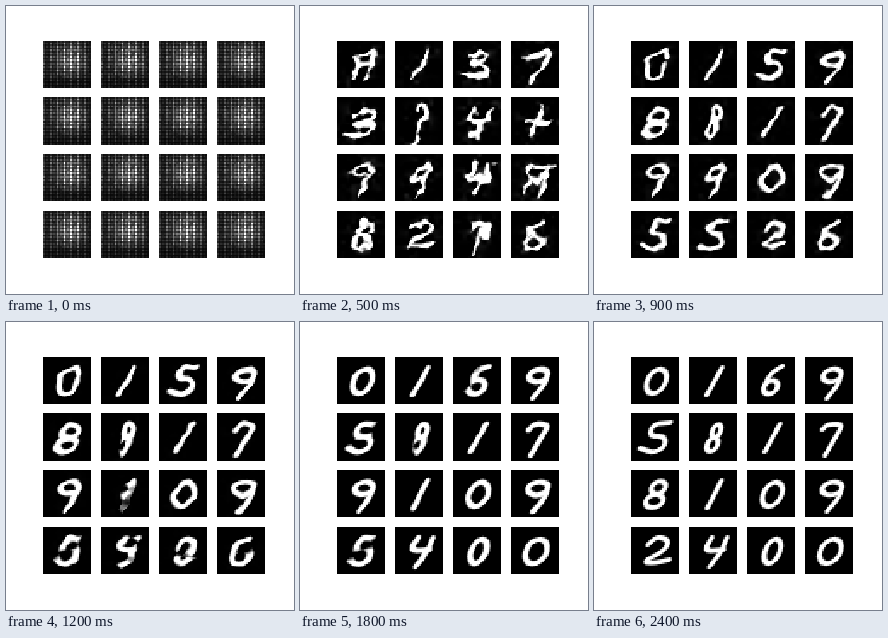
An HTML page with a canvas for the animation above (2.5 s loop, 288 by 288 pixels).

```html
<!DOCTYPE html>
<html lang="en">
<head>
<meta charset="utf-8">
<title>Digits emerging from noise</title>
<style>
html, body { margin: 0; width: 100%; height: 100%; overflow: hidden; background: #fff; }
canvas { display: block; }
</style>
</head>
<body>
<canvas id="stage" width="288" height="288"></canvas>
<script>
const N = 28, STEP = 100, FRAMES = 25;
const ctx = document.getElementById('stage').getContext('2d');
ctx.imageSmoothingEnabled = false;
const small = document.createElement('canvas');
small.width = small.height = N;
const smallCtx = small.getContext('2d');
const image = smallCtx.createImageData(N, N);

const clamp = v => Math.max(0, Math.min(1, v));
const mix = (a, b, t) => a + (b - a) * t;
const ease = t => t * t * (3 - 2 * t);

function hash(x, y, seed) {
  const h = Math.sin(x * 12.99 + y * 78.23 + seed * 37.7) * 43758.5453;
  return h - Math.floor(h);
}

// Smooth value noise
function noise(x, y, seed) {
  const i = Math.floor(x), j = Math.floor(y), u = ease(x - i), v = ease(y - j);
  return mix(mix(hash(i, j, seed), hash(i + 1, j, seed), u),
    mix(hash(i, j + 1, seed), hash(i + 1, j + 1, seed), u), v);
}

// Upright pen strokes around the origin
function ring(cx, cy, rx, ry) {
  return Array.from({ length: 17 }, (_, i) => {
    const a = i * Math.PI / 8;
    return [cx + rx * Math.cos(a), cy + ry * Math.sin(a)];
  });
}

function cutCorners(pts) {
  const cut = pts.slice(1).flatMap(([x, y], i) => [.25, .75].map(t =>
    [mix(pts[i][0], x, t), mix(pts[i][1], y, t)]));
  return [pts[0], ...cut, pts.at(-1)];
}

const pen = text => cutCorners(cutCorners(text.split(' ').map(p => p.split(',').map(Number))));

const glyphs = {
  0: [ring(0, 0, 5.5, 7.2)],
  1: [pen('2,-8 -2,8')],
  2: [pen('-6,-4 -2,-9 6,-6 4,0 -6,6 0,7 9,5')],
  3: [pen('-5,-5 4,-8 5,-3 -3,0'), pen('-1,1 7,2 5,8 -7,6')],
  4: [pen('-4,-8 -6,0 5,-1'), pen('5,-8 4,0 0,9')],
  5: [pen('5,-9 -4,-8 -4,-1 4,-1 6,5 1,9 -7,6')],
  6: [pen('3,-9 -3,-4 -4,4'), ring(0, 3.5, 4, 4)],
  7: [pen('-6,-5 -4,-8 5,-8 3,-1 0,10')],
  8: [ring(0, -4, 4, 3.7), ring(0, 4, 5, 4)],
  9: [ring(0, -3.5, 5.2, 3.8), pen('5,-4 5,2 1,10')],
  A: [pen('-5,-6 7,-6'), pen('-4,-5 -4,8'), pen('5,-5 4,8'), pen('-4,0 5,0')],
  C: [pen('5,-4 3,-9 -6,-6 -6,3 -2,9 5,6 4,0')],
  X: [pen('0,-9 0,8'), pen('-7,0 8,0')],
};

// Frames at which each successive glyph of a tile is reached
const poseFrames = [5, 9, 15, 20, 24];

// Successive glyphs, glyph width, strength of the early slanted blob
const tiles = [
  ['AC000', 1, .3], ['11111', 1, .9], ['35566', 1, .1], ['79999', 1, 1],
  ['38855', 1.1, .1], ['78988', .6, .5], ['41111', 1, .6], ['X7777', 1, .1],
  ['99998', 1, .3], ['99111', .8, .9], ['40000', 1, .4], ['A9999', 1.1, .8],
  ['85052', 1, 0], ['25444', 1, .5], ['72000', .8, .6], ['66000', 1.1, .4],
].map(([names, wide, streak], k) => ({
  streak,
  fields: [...names].map((name, pose) => distanceField(glyphs[name], wide, pose, k)),
}));

// Distance of each cell to the slanted strokes; early poses are warped
function distanceField(strokes, wide, pose, seed) {
  const warp = 5 * (1 - pose / 4) ** 2;
  const sway = (x, y, s) => warp * (noise(x / 5, y / 5, seed + s) - .5);
  return Float32Array.from({ length: N * N }, (_, i) => {
    const col = i % N, row = Math.floor(i / N);
    const y = row - 14 + sway(col, row, 20);
    const x = col - 14.3 + sway(col, row, 40) + .3 * y;
    let nearest = N;
    for (const pts of strokes) {
      for (let j = 1; j < pts.length; j++) {
        const ax = pts[j - 1][0] * wide, ay = pts[j - 1][1];
        const dx = pts[j][0] * wide - ax, dy = pts[j][1] - ay;
        const t = clamp(((x - ax) * dx + (y - ay) * dy) / (dx * dx + dy * dy || 1));
        nearest = Math.min(nearest, Math.hypot(x - ax - t * dx, y - ay - t * dy));
      }
    }
    return nearest;
  });
}

// Dim dashed lattice, nearly alike in all tiles
function lattice(x, y, k) {
  const glow = .22 + .7 * Math.exp(-((x - 15) ** 2) / 70 - ((y - 11) ** 2) / 90);
  const fade = 1 - .5 * clamp((y - 16) / 10);
  const column = x % 4 === 0 ? 1.25 : x % 2 ? .45 : .65;
  return glow * fade * column * (y % 2 ? 1.15 : .6) * (.5 + .6 * hash(x, y, 1) + .15 * hash(x, y, k));
}

// Dotted patch on the left and a soft slanted blob
function patch(x, y, k) {
  const { streak } = tiles[k];
  const cloud = noise(x / 5, y / 5, k + 60) - .5;
  const rim = clamp((x + 1) / 6) * clamp((y + 1) / 4) * clamp((29 - y) / 7);
  const body = clamp((21 - .2 * y - x) / 6 + .5 + cloud) * (1 - .85 * streak);
  const axis = 20 - .32 * (y - 4);
  const blob = streak * clamp((4.5 - Math.abs(x - axis)) / 4 + .5 + cloud);
  const light = rim * clamp(body + blob * 1.2 + .5 * cloud * (1 - streak));
  const hole = y % 2 ? 0 : x % 4 === 3 ? .8 : x % 2 ? .45 : .1;
  const speck = .35 * (x % 2) * (y % 2) * hash(x, y, k) * (1 - light);
  return light * 1.15 * (1 - hole * (1 - .8 * blob)) + speck;
}

function digit(x, y, k, frame) {
  let p = 0;
  while (p < 3 && frame >= poseFrames[p + 1]) p++;
  const t = clamp((frame - poseFrames[p]) / (poseFrames[p + 1] - poseFrames[p]));
  const [from, to] = tiles[k].fields.slice(p, p + 2);
  const d = mix(from[y * N + x], to[y * N + x], t);
  const rough = clamp((13 - frame) / 8);
  const cloud = noise(x / 3, y / 3, k + 80) - .5;
  const width = 1.5 + .8 * t * (1 - t) + 2 * rough * cloud;
  const haze = .8 * rough * clamp(cloud) * Math.exp(-d / 3);
  return clamp(width - d + .45) + haze;
}

function shade(x, y, k, frame) {
  if (frame < 2) return mix(lattice(x, y, k), patch(x, y, k), frame / 2);
  if (frame < 5) return mix(patch(x, y, k), digit(x, y, k, 5), (frame - 2) / 3);
  return digit(x, y, k, frame);
}

function draw(frame) {
  ctx.fillStyle = '#fff';
  ctx.fillRect(0, 0, 288, 288);
  tiles.forEach((_, k) => {
    for (let i = 0; i < N * N; i++) {
      const v = 255 * clamp(shade(i % N, Math.floor(i / N), k, frame));
      image.data.set([v, v, v, 255], i * 4);
    }
    smallCtx.putImageData(image, 0, 0);
    const top = 34.56 + 56.72 * Math.floor(k / 4), y = Math.round(top);
    ctx.drawImage(small, 37 + 58 * (k % 4), y, 48, Math.round(top + 47.27) - y);
  });
}

let shown = -1;
function tick() {
  const frame = Math.floor(performance.now() / STEP) % FRAMES;
  if (frame !== shown) draw(shown = frame);
  requestAnimationFrame(tick);
}
tick();
</script>
</body>
</html>
```
